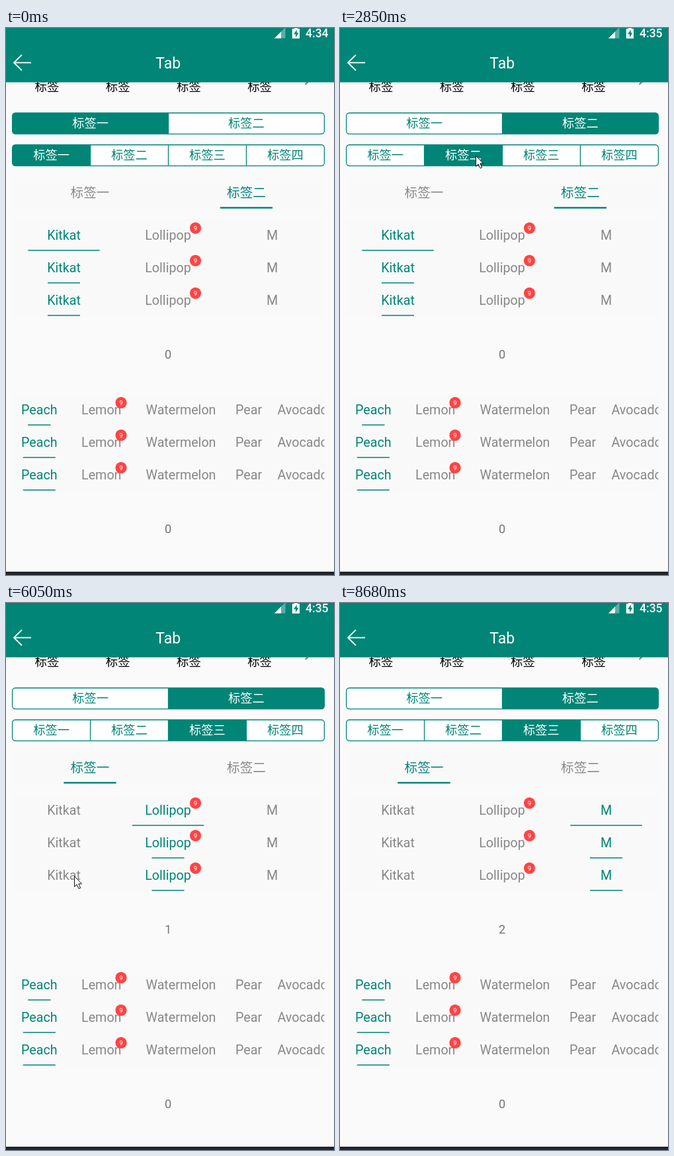
Write an HTML page that moves like this. It is 496x824 px and loops after 9150 ms.

```html
<!DOCTYPE html>
<html lang="zh-CN">
<head>
<meta charset="utf-8">
<title>Tab</title>
<style>
html, body { margin: 0; width: 100%; height: 100%; overflow: hidden; background: #fafafa; }
svg { display: block; width: 100%; height: 100%; }
text { font-family: Roboto, "Noto Sans CJK SC", "Noto Sans CJK", sans-serif; white-space: pre; }
</style>
</head>
<body>
<svg id="stage" viewBox="0 0 496 824"></svg>
<script>
const TEAL = '#008577', GRAY = '#888', RED = '#ff4444', LOOP = 9150;
const LEFT = 9, WIDTH = 473, ROW = 49;
const NAMES = ['标签一', '标签二', '标签三', '标签四'];
const stage = document.getElementById('stage');

function set(el, attrs) {
  for (const k in attrs) el.setAttribute(k, attrs[k]);
}
function add(tag, attrs, parent = stage) {
  const el = document.createElementNS('http://www.w3.org/2000/svg', tag);
  set(el, attrs);
  parent.appendChild(el);
  return el;
}
function label(str, x, y, size, fill, more = {}, parent = stage) {
  const el = add('text', { x, y, 'font-size': size, fill, 'text-anchor': 'middle', ...more }, parent);
  el.textContent = str;
  return el;
}
const rect = (x, y, width, height, fill, parent) => add('rect', { x, y, width, height, fill }, parent);
function clip(id, y, height) {
  rect(LEFT, y, WIDTH - .5, height, '#000', add('clipPath', { id }));
  return add('g', { 'clip-path': `url(#${id})` });
}
function badge(x, y) {
  add('circle', { cx: x, cy: y, r: 8.6, fill: RED });
  label('9', x, y + 3.4, 9.5, '#fff');
}
const panel = (y, h) => rect(LEFT, y, WIDTH, h, '#f9f9f9');
const paint = (texts, sel, on, off) => texts.forEach((el, i) => set(el, { fill: i === sel ? on : off }));

// Scrolled content under the header
rect(0, 0, 496, 824, '#fafafa');
for (let i = 0; i < 4; i++) label('标签', 62 + i * 107.2, 95.2, 18.4, '#000');
add('path', { d: 'M452.5 85 L459 79', stroke: '#777', 'stroke-width': 2, fill: 'none' });

// Header
rect(0, 0, 496, 81.8, TEAL);
label('Tab', 245.3, 61, 23, '#fff');
add('path', { d: 'M38 52.3H12M24 40.5L12 52.3L24 64', stroke: '#e6f3f1', 'stroke-width': 2, fill: 'none' });
add('path', { d: 'M406 15.5H422.5V-1Z', fill: '#fff', opacity: .35 });
add('path', { d: 'M406 15.5H416V5.5Z', fill: '#fff' });
add('path', { d: 'M432.8 1.3H436V0H441V1.3H444V15.7H432.8Z', fill: '#fff' });
add('path', { d: 'M439.8 2.5L435 9.2H438V14.5L442.3 7.2H439.8Z', fill: TEAL });
const clock = label('4:34', 470.3, 13.7, 17.5, '#fff', { 'font-weight': 500 });

// Segmented control; returns its selector
function segments(y, names) {
  const x = LEFT + .6, w = WIDTH - 1.2, h = 31.6, r = 4.5, n = names.length, sw = w / n;
  add('rect', { x, y, width: w, height: h, rx: r, fill: '#fff' });
  const fill = add('path', { fill: TEAL });
  for (let i = 1; i < n; i++) rect(x + i * sw - .65, y, 1.3, h, TEAL);
  add('rect', { x, y, width: w, height: h, rx: r, fill: 'none', stroke: TEAL, 'stroke-width': 1.3 });
  const texts = names.map((s, i) => label(s, x + (i + .5) * sw, y + 22.1, 18.3, TEAL));
  return sel => {
    const a = sel ? 0 : r, b = sel === n - 1 ? r : 0;
    set(fill, { d: `M${x + sel * sw + a} ${y}h${sw - a - b}q${b} 0 ${b} ${b}v${h - 2 * b}q0 ${b} ${-b} ${b}` +
      `h${a + b - sw}q${-a} 0 ${-a} ${-a}v${2 * a - h}q0 ${-a} ${a} ${-a}z` });
    paint(texts, sel, '#fff', TEAL);
  };
}
const pair = segments(128, NAMES.slice(0, 2));
const quad = segments(176, NAMES);

// Two plain tabs
panel(224, 48);
const tabs = [0, 1].map(i => label(NAMES[i], 127 + i * WIDTH / 2, 255, 19.6, GRAY));
const tabLine = rect(0, 269.6, 79.3, 2.4, TEAL);

// Three rows bound to the pager
const COL = 87.5, STEP = 157.5;
panel(288, 3 * ROW);
const rows = [0, 1, 2].map(r => {
  const y = 319 + r * ROW;
  const texts = ['Kitkat', 'Lollipop', 'M'].map((s, i) => label(s, COL + i * STEP, y, 19.7, GRAY));
  badge(286.5, y - 17.7);
  return { texts, line: rect(0, y + 15.2, 0, 1.5, TEAL) };
});
const pager = clip('pager', 440, 105);
const pages = [0, 1, 2].map(i => label(i, 0, 498, 18.2, '#757575', {}, pager));

// Scrollable fruit tabs
const FRUIT = [['Peach', 50.3], ['Lemon', 144.3], ['Watermelon', 264.5], ['Pear', 367], ['Avocado', 448.6]];
panel(551, 3 * ROW);
for (let r = 0; r < 3; r++) {
  const y = 582 + r * ROW, half = r ? 24.5 : 17.2, g = clip('fruit' + r, y - 30, 45);
  FRUIT.forEach(([s, x], i) => label(s, x, y, 19.7, i ? GRAY : TEAL, {}, g));
  badge(174, y - 17.6);
  rect(50.3 - half, y + 15.2, 2 * half, 1.5, TEAL);
}
label('0', 245.2, 761, 18.2, '#757575');
rect(0, 819, 496, 5, '#22252a');

const cursor = add('path', {
  d: 'M.5 .5V16.5L4.2 13L7 19.3L9.6 18.2L6.9 12H11.5Z',
  fill: '#fff', stroke: '#111', 'stroke-linejoin': 'round'
});

// Motion
const clamp = v => Math.max(0, Math.min(1, v));
const progress = (t, start, ms) => clamp((t - start) / ms);
const smooth = k => k * k * (3 - 2 * k);
const tap = (t, start) => 1 - (1 - progress(t, start, 200)) ** 5;
const swipe = (t, start) => smooth(progress(t, start, 400));

// The screen refreshes about 13 times a second
const TICK = 77.6, FIRST = 70;
const tick = t => FIRST + TICK * Math.floor((t - FIRST) / TICK + .2);

// Pointer moves: start, end, x, y
const MOVES = [
  [70, 360, 239, 313], [700, 1460, 317, 164], [1720, 2160, 205, 192], [2880, 3230, 313, 190],
  [3500, 4020, 121, 257], [4280, 4900, 235, 366], [5150, 6040, 103, 411], [6300, 6830, 318, 490],
  [6900, 7222, 2, 500], [7300, 7780, 430, 520], [7800, 8120, 245, 523], [8120, 8680, 452, 810]
];
function pointer(t) {
  let x = 405, y = 763;
  for (const [start, end, toX, toY] of MOVES) {
    const k = smooth(progress(t, start, end - start));
    x += (toX - x) * k;
    y += (toY - y) * k;
  }
  return `translate(${x} ${y})`;
}

function draw(time) {
  const t = tick(time);
  const after = at => t >= at ? 1 : 0;

  clock.textContent = after(2300) ? '4:35' : '4:34';
  pair(after(1600));
  quad(after(2840) + after(3470));
  paint(tabs, 1 - after(4240), TEAL, GRAY);
  set(tabLine, { x: 87.3 + WIDTH / 2 * (1 - smooth(progress(t, 4220, 270))) });

  const pos = tap(t, 5069) - tap(t, 6248) + swipe(t, 7000) + swipe(t, 7838);
  const sel = after(5100) - after(6260) + after(7190) + after(8040);
  const base = Math.floor(pos), f = pos - base;
  // Row 0 stretches, row 1 slides, row 2 jumps
  const spans = [
    [base + clamp(2 * f - 1), base + clamp(2 * f), 54.2],
    [pos, pos, 24.5],
    [sel, sel, 24.5]
  ];
  rows.forEach(({ texts, line }, r) => {
    const [a, b, half] = spans[r];
    set(line, { x: COL + a * STEP - half, width: (b - a) * STEP + 2 * half });
    paint(texts, sel, TEAL, GRAY);
  });
  pages.forEach((el, i) => set(el, { x: 245.2 + (i - pos) * WIDTH }));

  set(cursor, {
    transform: pointer(t),
    visibility: after(FIRST) && !after(8670) ? 'visible' : 'hidden'
  });
}

const start = performance.now();
function frame() {
  draw((performance.now() - start) % LOOP);
  requestAnimationFrame(frame);
}
draw(0);
requestAnimationFrame(frame);
</script>
</body>
</html>
```
